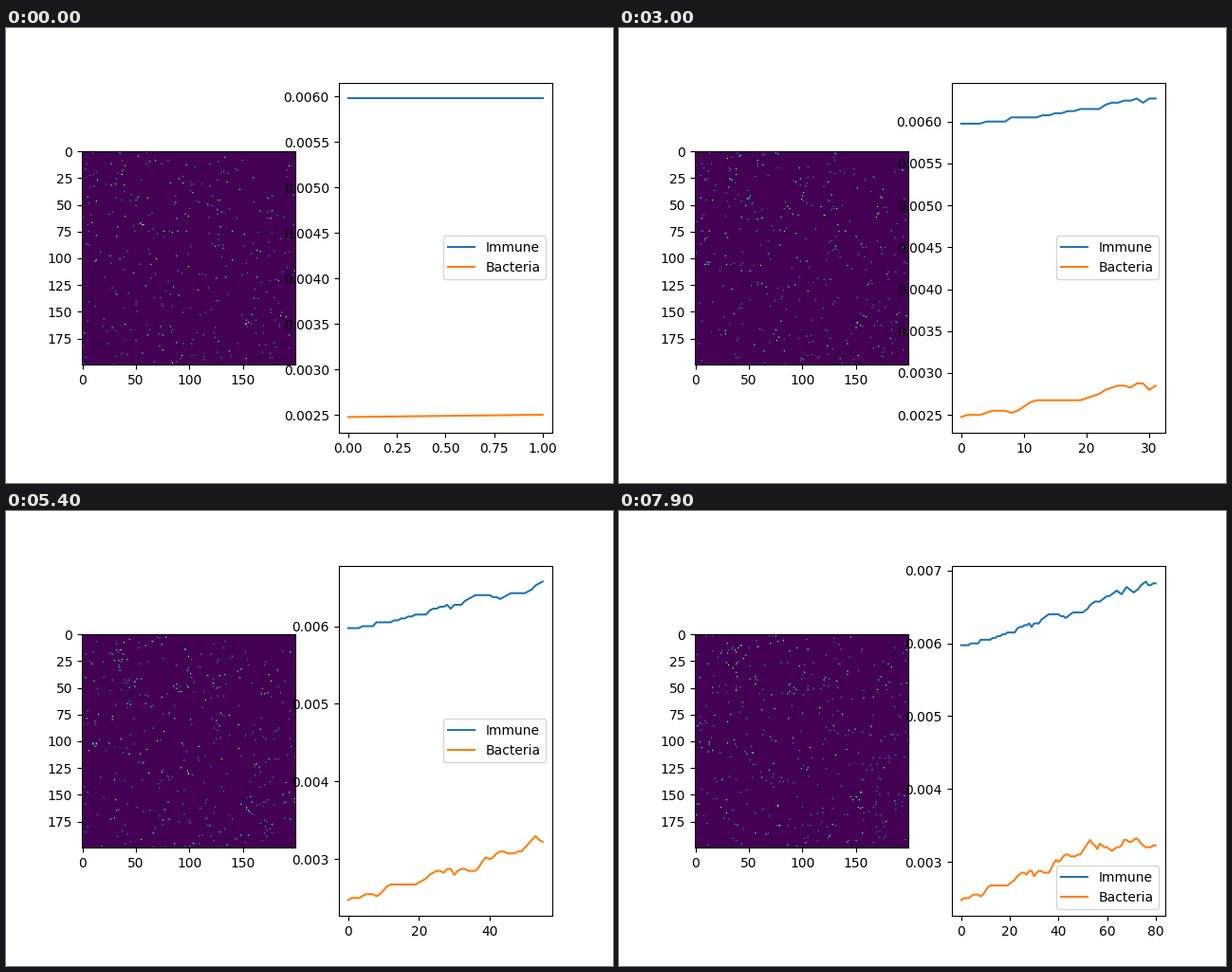
These frames come from a looping animation (640 by 480 pixels, 8 s). A matplotlib script:

```python
import numpy as np
import matplotlib.pyplot as plt
from matplotlib.animation import FuncAnimation

SIZE = 200
FRAMES = 80

# Turning points (step, cells on the grid) of each population
IMMUNE = [
    (0, 239), (3, 239), (4, 240), (7, 240), (8, 242), (12, 242), (19, 246),
    (22, 246), (23, 248), (28, 251), (29, 249), (30, 251), (32, 251), (33, 253),
    (36, 256), (40, 256), (43, 254), (46, 257), (50, 257), (55, 263), (57, 263),
    (64, 269), (66, 267), (68, 271), (71, 268), (76, 274), (77, 272), (80, 273)]
BACTERIA = [
    (0, 99), (1, 100), (3, 100), (5, 102), (7, 102), (8, 101), (12, 107),
    (19, 107), (25, 114), (27, 113), (28, 115), (29, 115), (30, 112), (32, 115),
    (36, 114), (39, 121), (40, 120), (43, 124), (46, 123), (49, 124), (53, 132),
    (56, 127), (57, 130), (62, 126), (66, 129), (67, 132), (70, 131), (72, 133),
    (76, 128), (80, 129)]


def population(points):
    """Whole cell counts for every step between the turning points."""
    steps, cells = zip(*points)
    return np.rint(np.interp(np.arange(FRAMES + 1), steps, cells)).astype(int)


def walk(counts, rng):
    """Random walk on a torus; cells split or die to follow the counts."""
    cells = rng.integers(0, SIZE, (counts[0], 2))
    for count in counts[1:]:
        cells = (cells + rng.integers(-1, 2, cells.shape)) % SIZE
        if count < len(cells):
            cells = rng.permutation(cells)[:count]
        elif count > len(cells):
            parents = cells[rng.integers(0, len(cells), count - len(cells))]
            children = (parents + rng.integers(-1, 2, parents.shape)) % SIZE
            cells = np.vstack([cells, children])
        yield cells


def make_grid(immune, bacteria):
    grid = np.zeros((SIZE, SIZE))
    grid[tuple(immune.T)] = 1
    grid[tuple(bacteria.T)] = 2
    return grid


rng = np.random.default_rng(7)
counts = {"Immune": population(IMMUNE), "Bacteria": population(BACTERIA)}
grids = [make_grid(*cells)
         for cells in zip(*(walk(c, rng) for c in counts.values()))]

fig, (ax_grid, ax_plot) = plt.subplots(1, 2, figsize=(6.4, 4.8), dpi=100)
image = ax_grid.imshow(grids[0], cmap="viridis", vmin=0, vmax=2)
lines = {name: ax_plot.plot([], [], label=name)[0] for name in counts}
ax_plot.legend(loc="best")


def update(frame):
    image.set_data(grids[frame])
    n = frame + 2
    for name, line in lines.items():
        line.set_data(np.arange(n), counts[name][:n] / SIZE**2)
    ax_plot.relim()
    ax_plot.autoscale_view()
    return [image, *lines.values()]


anim = FuncAnimation(fig, update, frames=FRAMES, interval=100,
                     init_func=lambda: update(0), repeat=True, repeat_delay=0)
plt.show()
```
